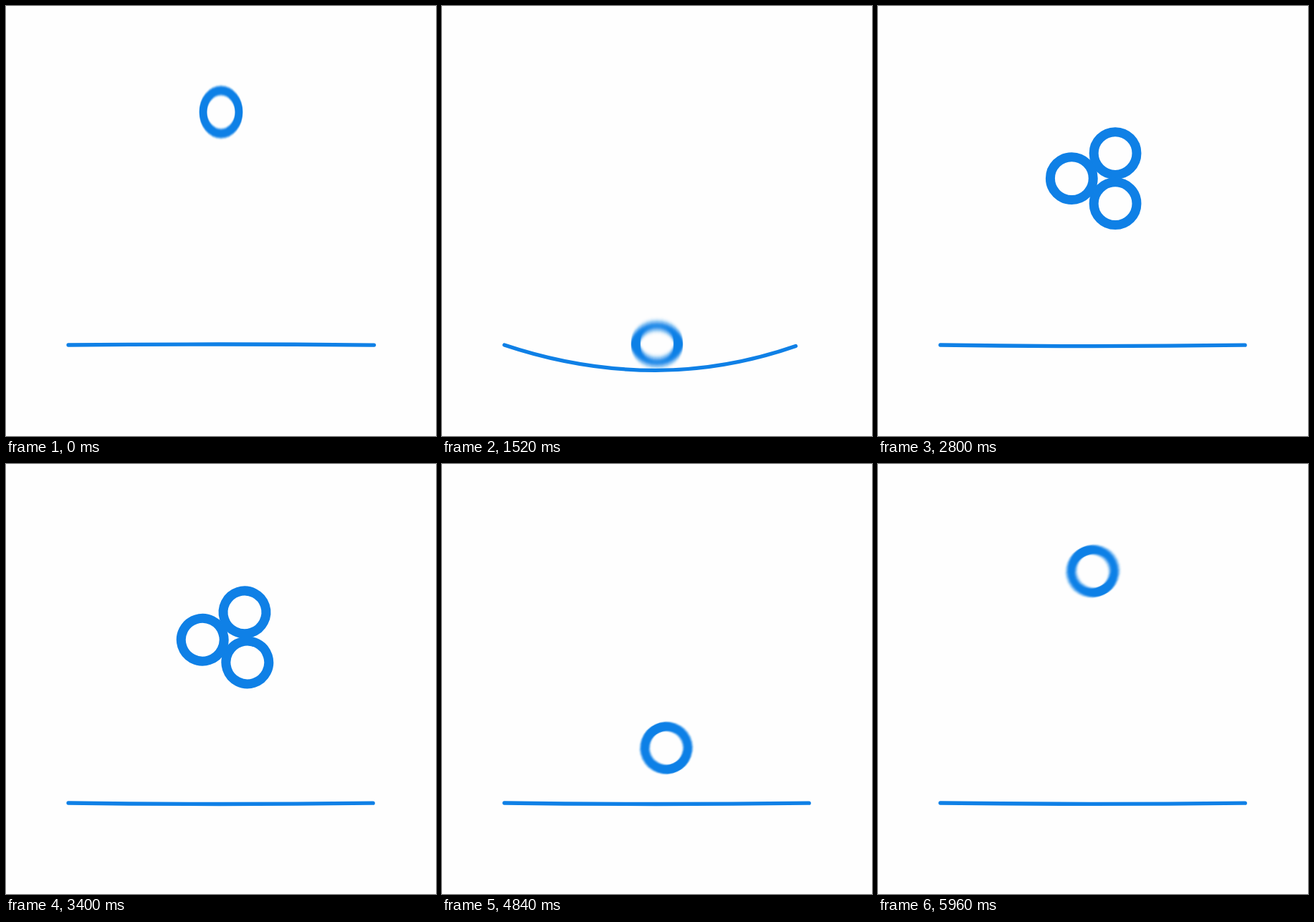
These frames come from a looping animation (600 by 600 pixels, 6 s). An HTML page:

```html
<!DOCTYPE html>
<html>
<head>
<meta charset="utf-8">
<style>
html, body { margin: 0; width: 100%; height: 100%; overflow: hidden; background: #fefefe; }
svg { display: block; width: 600px; height: 600px; }
* { fill: none; stroke: #0f80e6; }
</style>
</head>
<body>
<svg viewBox="0 0 600 600">
  <filter id="soft" filterUnits="userSpaceOnUse" x="-60" y="-60" width="120" height="120">
    <feGaussianBlur id="blur" stdDeviation="0 0"/>
  </filter>
  <path id="string" stroke-width="5.3" stroke-linecap="round"/>
  <g id="ball"><g filter="url(#soft)"><circle id="ring" r="29.9" stroke-width="13"/></g></g>
  <g id="trio" stroke-width="13">
    <circle r="29.9"/><circle r="29.9"/><circle r="29.9"/>
  </g>
</svg>
<script>
const LOOP = 6000, FALL = 289.5;
const $ = id => document.getElementById(id);
const set = (id, name, value) => $(id).setAttribute(name, value);

const smooth = u => u * u * (3 - 2 * u);
const easeIn = power => u => u ** power;
const easeOut = power => u => 1 - (1 - u) ** power;
const arc = u => 4 * u * (1 - u);
const ramp = (t, from, to, ease = smooth) =>
  ease(Math.min(1, Math.max(0, (t - from) / (to - from))));

// Each time the ball meets the string: how deep it sinks, how hard the string springs back.
const bounces = [
  { hit: 470, leave: 670, depth: 13, kick: 48 },
  { hit: 1340, leave: 1680, depth: 34.3, kick: 72 },
  { hit: 4890, leave: 5080, depth: 15.5, kick: 27 }
];
const press = (t, { hit, leave }) => ramp(t, hit, leave, u => u < 1 ? Math.sin(Math.PI * u) : 0);
const sum = f => bounces.reduce((total, bounce) => total + f(bounce), 0);

function spring(t, { leave, kick }) {
  const s = t - leave;
  return s > 0 ? -kick * Math.exp(-s / 180) * Math.sin(Math.PI * s / 200) : 0;
}

function drawString(t, dip) {
  const bow = dip + sum(b => spring(t, b)) - 1 + 2.5 * ramp(t, 0, 470);
  const left = 87, mid = 298, right = 513 - .55 * bow, peak = 473 + bow;
  const rightY = 473 + Math.min(1.5, Math.abs(bow) / 12);
  set('string', 'd', `M${left} 473Q${(left + mid) / 2} ${peak} ${mid} ${peak}`
    + `Q${(mid + right) / 2} ${peak} ${right} ${rightY}`);
}

function draw(t) {
  const dip = sum(b => b.depth * press(t, b));
  drawString(t, dip);

  const x = 300 + 12 * ramp(t, 2300, 2780) + ramp(t, 4560, 4840) - 13.3 * ramp(t, 4840, 5960);
  const y = 148 + dip
    + FALL * ramp(t, 0, 470, easeIn(2))
    - 108 * ramp(t, 670, 1340, arc)
    - FALL * ramp(t, 1680, 2000, easeOut(2))
    + 132 * ramp(t, 2000, 2500)
    - 37 * ramp(t, 2500, 2800)
    - 4 * ramp(t, 4040, 4280)
    + (FALL - 91) * ramp(t, 4560, 4890, easeIn(1.45))
    - FALL * ramp(t, 5080, 6000);
  const at = `translate(${x} ${y})`;

  // One ball: narrow in flight, flat on the string, softened along one axis.
  const narrow = 1 - ramp(t, 2000, 2400);
  const squash = Math.min(1, 2 * sum(b => press(t, b)));
  const softness = 1.6 + 2 * ramp(t, 0, 300) - 2 * ramp(t, 1700, 2000)
    - 1.6 * ramp(t, 2000, 2480) + 1.5 * ramp(t, 4560, 4840) + .5 * ramp(t, 4840, 5960);
  set('ball', 'transform', `${at} rotate(${t > 3000 ? 65 : 0})`);
  set('blur', 'stdDeviation', `0 ${softness}`);
  set('ring', 'transform',
    `scale(${1 - .165 * narrow * (1 - squash)} ${1 - .15 * narrow * squash})`);

  // Three balls: spread around a point slightly off their middle, then turn.
  const spread = ramp(t, 2480, 2800) - ramp(t, 4040, 4280);
  set('trio', 'transform', `${at} rotate(${280 * ramp(t, 3020, 4280, easeOut(1.5))})`);
  [...$('trio').children].forEach((circle, i) => {
    const angle = (2 * i - 1) * Math.PI / 3;
    circle.setAttribute('transform',
      `translate(${spread * (40.5 * Math.cos(angle) - 1.2)} ${spread * (40.5 * Math.sin(angle) - 2.4)})`);
  });
  $('ball').style.display = spread > 0 ? 'none' : '';
  $('trio').style.display = spread > 0 ? '' : 'none';
}

const start = performance.now();
function tick() {
  draw((performance.now() - start) % LOOP);
  requestAnimationFrame(tick);
}
tick();
</script>
</body>
</html>
```
